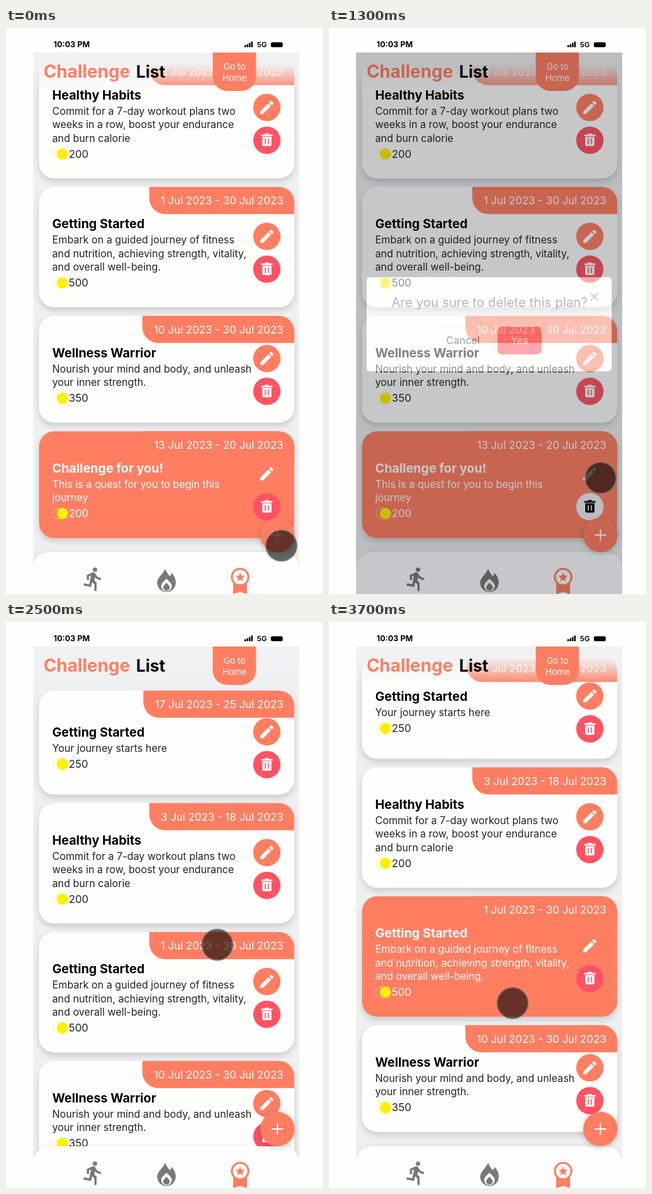
An HTML page for the animation above (3800 ms loop, 480x854 px).

```html
<!DOCTYPE html>
<html lang="en">
<head>
<meta charset="utf-8">
<title>Challenge List</title>
<style>
  html, body { margin: 0; height: 100%; overflow: hidden; background: #fefefc; }
  svg { display: block; width: 480px; height: 854px; font-family: Inter, "Open Sans", sans-serif; }
  .card { --bg: #fefefd; --ink: #000; --soft: #222; --bin: #ff5364; --binInk: #fff; }
  .box { fill: var(--bg); filter: drop-shadow(0 5px 5px rgba(0, 0, 0, .15)); }
  .title { font-size: 18.8px; font-weight: 700; fill: var(--ink); }
  .line { font-size: 15.35px; fill: var(--soft); }
  .points { font-size: 16px; fill: var(--soft); }
  .date { font-size: 16.1px; text-anchor: end; fill: #fff; }
  .salmon { fill: #ff7e62; }
  .white { fill: #fff; }
  .mid { text-anchor: middle; }
  .soft { filter: drop-shadow(0 2px 4px rgba(0, 0, 0, .22)); }
  .nav { fill: #fefefe; filter: drop-shadow(0 -1px 4px rgba(0, 0, 0, .06)); }
</style>
</head>
<body>
<svg viewBox="0 0 480 854">
  <defs>
    <clipPath id="screen"><path d="M41 37H444V854H41Z"/></clipPath>
    <linearGradient id="fade" x2="0" y2="1">
      <stop offset=".3" stop-color="#f0f1f2"/>
      <stop offset="1" stop-color="#f0f1f2" stop-opacity="0"/>
    </linearGradient>
    <path id="pencil" transform="scale(1.1) translate(-12 -12)" d="M3 17.25V21h3.75L17.81 9.94l-3.75-3.75zM20.71 7.04a1 1 0 0 0 0-1.41l-2.34-2.34a1 1 0 0 0-1.41 0l-1.83 1.83 3.75 3.75z"/>
    <path id="bin" fill-rule="evenodd" d="M-8.5-8.5h5l1-1.5h5l1 1.5h5v2.5h-17zM-7-5H7V7a2 2 0 0 1-2 2H-5a2 2 0 0 1-2-2zM-3.2-2.5v8.5h1.7v-8.5zM1.5-2.5v8.5h1.7v-8.5z"/>
  </defs>

  <rect x="41" width="403" height="37" fill="#fefefe"/>
  <g font-weight="700">
    <text x="72" y="28.5" font-size="12">10:03 PM</text>
    <text x="380" y="29" font-size="11" font-weight="600">5G</text>
  </g>
  <path d="M361 26h2.4v3h-2.4zM364.4 24.5h2.4V29h-2.4zM367.8 22.5h2.4V29h-2.4zM371.2 20.5h2.4V29h-2.4z"/>
  <rect x="401" y="21.5" width="18" height="7.5" rx="2.5"/>

  <g clip-path="url(#screen)">
    <path d="M41 37H444V854H41Z" fill="#eff0f1"/>
    <g id="list"></g>

    <rect x="41" y="37" width="403" height="58" fill="url(#fade)"/>
    <g font-size="26.5" font-weight="700">
      <text class="salmon" x="57" y="74.5">Challenge</text>
      <text x="197" y="74.5" font-size="25">List</text>
    </g>
    <path class="salmon" d="M313 37h65.5v36a22 22 0 0 1-22 22h-21.5a22 22 0 0 1-22-22z"/>
    <g class="white mid" font-size="13">
      <text x="346" y="62.5">Go to</text>
      <text x="346" y="79.5">Home</text>
    </g>

    <path class="nav" d="M41 854V815a24 24 0 0 1 24-24H420a24 24 0 0 1 24 24V854z"/>
    <path fill="#787878" transform="translate(112.5 811.5) scale(1.65)" d="M13.49 5.48a2 2 0 1 0 0-4 2 2 0 0 0 0 4zm-3.6 13.9l1-4.4 2.1 2v6h2v-7.5l-2.1-2 .6-3c1.3 1.5 3.3 2.5 5.5 2.5v-2c-1.9 0-3.5-1-4.3-2.4l-1-1.6c-.4-.6-1-1-1.7-1-.3 0-.5.1-.8.1l-5.2 2.2v4.7h2v-3.4l1.8-.7-1.6 8.1-4.9-1-.4 2z"/>
    <path fill="#787878" d="M241 816c2 5 4 8 7 11 2-1 2-3 2-5 5 4 7 9 7 15a14 14 0 0 1-28 0c0-8 8-12 12-21z"/>
    <path fill="#fefefe" d="M243 831c5 5 8 7 8 11a8 8 0 0 1-16 0c0-4 3-6 8-11z"/>
    <path fill="#787878" d="M243 837c3 3 5 5 5 7a5 5 0 0 1-10 0c0-2 2-4 5-7z"/>
    <path class="salmon" d="M344 838h21v16l-10.5-3-10.5 3z"/>
    <circle cx="354.5" cy="828.5" r="12.5" fill="#fefefe" stroke="#ff7e62" stroke-width="3"/>
    <path class="salmon" d="M354.5 821.5l2 4.7 5 .4-3.8 3.3 1.2 5-4.4-2.7-4.4 2.7 1.2-5-3.8-3.3 5-.4z"/>

    <circle class="salmon soft" cx="411" cy="765" r="26"/>
    <path id="plus" d="M402.5 765h17M411 756.5v17" stroke="#fff" stroke-width="2"/>

    <g id="modal">
      <path d="M41 37H444V854H41Z" fill="#10141e" opacity=".46"/>
      <rect x="57" y="376" width="371" height="142" rx="5" fill="#fefefe"/>
      <text class="mid" x="243" y="420.5" font-size="19.6" fill="#6b7280">Are you sure to delete this plan?</text>
      <path d="M396 400l11 11m0-11l-11 11" stroke="#858b94" stroke-width="1.5"/>
      <rect x="156" y="450.5" width="94" height="42" rx="7" fill="#fff" stroke="#e8eaed"/>
      <rect x="255" y="450.5" width="67" height="42" rx="7" fill="#ff5364"/>
      <g class="mid" font-size="15.3" font-weight="500">
        <text x="203" y="476.5" fill="#565d69">Cancel</text>
        <text class="white" x="288.5" y="476.5">Yes</text>
      </g>
    </g>
  </g>
  <circle id="touch" r="23.5" fill="#000" fill-opacity=".6" stroke="#777" stroke-opacity=".6" stroke-width="2"/>
</svg>

<script>
const LOOP = 3800, STEP = 100, GAP = 12.8, DELETED = 2300;
const $ = id => document.getElementById(id);

const plans = [
  { tag: 208, date: '17 Jul 2023 - 25 Jul 2023', title: 'Getting Started', points: 250,
    lines: ['Your journey starts here'] },
  { tag: 217, date: '3 Jul 2023 - 18 Jul 2023', title: 'Healthy Habits', points: 200,
    lines: ['Commit for a 7-day workout plans two', 'weeks in a row, boost your endurance', 'and burn calorie'] },
  { tag: 217, date: '1 Jul 2023 - 30 Jul 2023', title: 'Getting Started', points: 500,
    lines: ['Embark on a guided journey of fitness', 'and nutrition, achieving strength, vitality,', 'and overall well-being.'],
    hover: [[2900, 0], [3000, .35], [3100, .78], [3200, 1]] },
  { tag: 206.5, date: '10 Jul 2023 - 30 Jul 2023', title: 'Wellness Warrior', points: 350,
    lines: ['Nourish your mind and body, and unleash', 'your inner strength.'],
    hover: [[2700, 0], [2900, 1], [3000, .65], [3100, .2], [3200, 0]] },
  { tag: 207.5, date: '13 Jul 2023 - 20 Jul 2023', title: 'Challenge for you!', points: 200,
    lines: ['This is a quest for you to begin this', 'journey'], until: DELETED,
    hover: [[0, 1], [100, 1], [300, 0], [800, 0], [1000, .88], [1100, 1], [1300, 1], [1500, 0]],
    bin: [[800, 0], [1000, 1], [1300, 1], [1500, 0]] }
];

const scrollStops = [[DELETED - 1, 228], [DELETED, 0], [2600, 0], [2900, 54]];
const modalStops = [[1200, 0], [1400, 1], [2000, 1], [2200, 0]];
const plusStops = [[0, .4], [200, 1]];
const touchStops = [
  [0, 417, 781], [200, 443, 765], [900, 441, 745], [1000, 432, 739], [1200, 434, 737],
  [1700, 320, 446], [1900, 320, 487], [2500, 320, 487], [2800, 296, 640],
  [3100, 271, 471], [3700, 278, 575]
];

// Linear interpolation through [time, value, ...] stops
function at(stops, t, i = 1) {
  const n = stops.findIndex(s => s[0] > t);
  if (n === 0) return stops[0][i];
  if (n < 0) return stops[stops.length - 1][i];
  const a = stops[n - 1], b = stops[n];
  return a[i] + (b[i] - a[i]) * (t - a[0]) / (b[0] - a[0]);
}

const mix = (a, b, k) => `rgb(${a.map((v, i) => Math.round(v + (b[i] - v) * k))})`;
const WHITE = [254, 254, 253], BLACK = [0, 0, 0], INK = [34, 34, 34];
const SALMON = [255, 126, 98], RED = [255, 83, 100], PALE = [241, 240, 244];

function cardMarkup({ tag, date, title, lines, points }, h) {
  const n = lines.length, dy = n === 1 ? 7 : 0, coin = 83.5 + 20.4 * n + dy;
  return `
    <rect class="box" x="50" width="386.5" height="${h}" rx="23"/>
    <path class="salmon" d="M${tag} 0H413.5a23 23 0 0 1 23 23V41H${tag + 24}a24 24 0 0 1-24-24z"/>
    <text class="date" x="420" y="26.3">${date}</text>
    <text class="title" x="70" y="${62.5 + dy}">${title}</text>
    ${lines.map((s, i) => `<text class="line" x="70" y="${85.5 + dy + 20.4 * i}">${s}</text>`).join('')}
    <circle cx="79" cy="${coin}" r="7.8" fill="none" stroke="#fff06a" stroke-dasharray="2 1"/>
    <circle cx="85.5" cy="${coin}" r="8.6" fill="#ffef00"/>
    <text class="points" x="95" y="${coin + 5.8}">${points}</text>
    <g transform="translate(395 ${h / 2 - 16.3})">
      <circle class="salmon" r="20.7"/><use href="#pencil" class="white"/>
    </g>
    <g transform="translate(395 ${h / 2 + 33.2})">
      <circle r="20.7" style="fill:var(--bin)"/><use href="#bin" style="fill:var(--binInk)"/>
    </g>`;
}

let nextY = 103.5;
const cards = plans.map(plan => {
  const h = Math.max(157, 120.5 + 20.4 * plan.lines.length), y = nextY;
  const el = document.createElementNS('http://www.w3.org/2000/svg', 'g');
  el.setAttribute('class', 'card');
  el.innerHTML = cardMarkup(plan, h);
  $('list').append(el);
  nextY += h + GAP;
  return { ...plan, el, y };
});

function draw(t) {
  const shift = at(scrollStops, t);
  for (const { el, y, hover, bin, until = LOOP } of cards) {
    el.setAttribute('transform', `translate(0 ${y - shift})`);
    el.style.display = t < until ? '' : 'none';
    const set = (name, a, b, k) => el.style.setProperty(name, mix(a, b, k));
    if (hover) {
      const k = at(hover, t);
      set('--bg', WHITE, SALMON, k);
      set('--ink', BLACK, WHITE, k);
      set('--soft', INK, WHITE, k);
    }
    if (bin) {
      const k = at(bin, t);
      set('--bin', RED, PALE, k);
      set('--binInk', WHITE, BLACK, k);
    }
  }
  $('modal').setAttribute('opacity', at(modalStops, t));
  $('plus').setAttribute('opacity', at(plusStops, t));
  $('touch').setAttribute('transform', `translate(${at(touchStops, t)} ${at(touchStops, t, 2)})`);
  $('touch').style.display = t > 200 && t < 900 ? 'none' : '';
}

function tick() {
  draw(Math.floor(performance.now() % LOOP / STEP) * STEP);
  requestAnimationFrame(tick);
}
tick();
</script>
</body>
</html>
```
